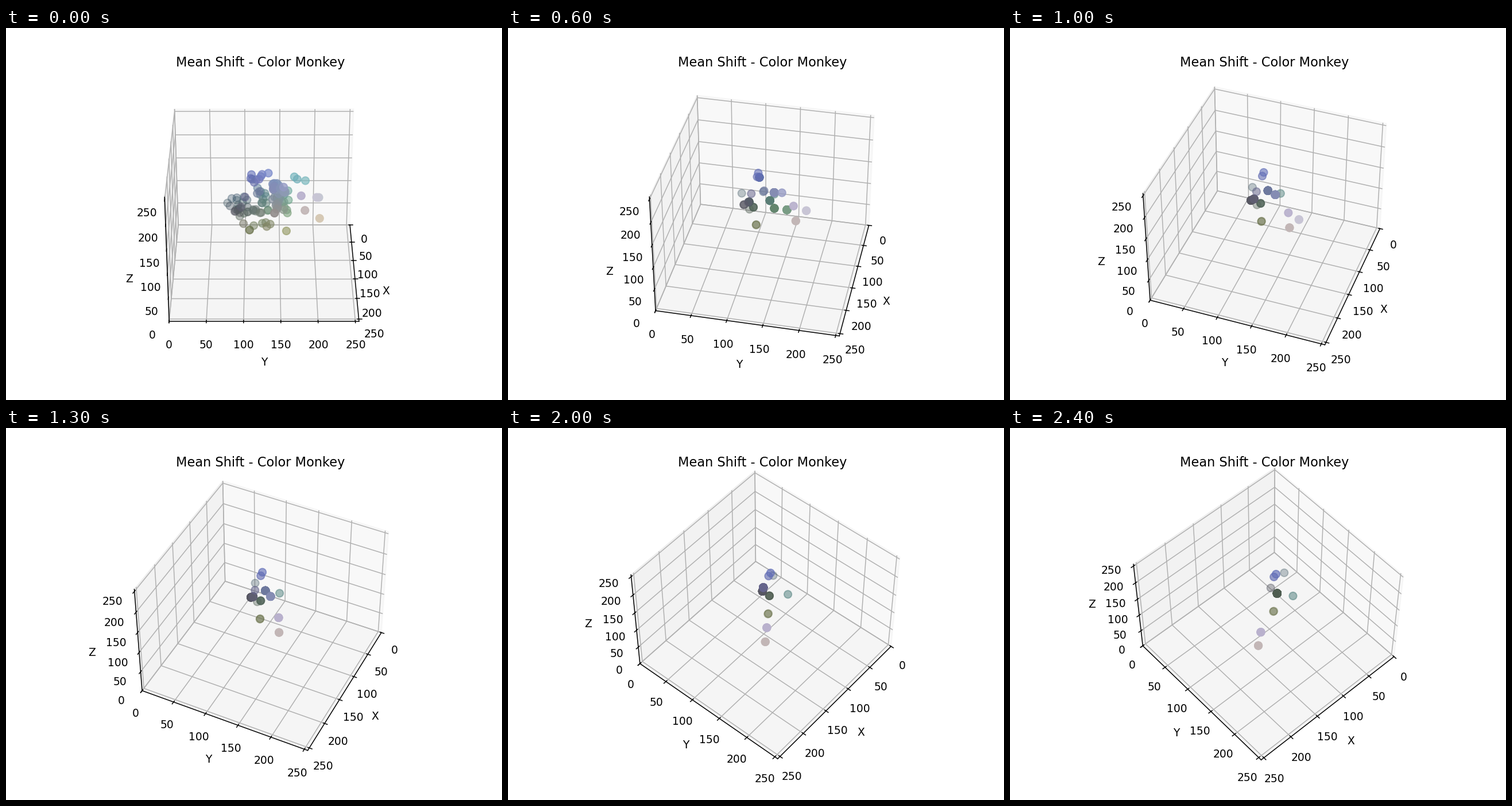
A matplotlib script for the animation above (2500 ms loop, 864 by 648 pixels).

```python
import numpy as np
import matplotlib.pyplot as plt
from matplotlib.animation import FuncAnimation

FRAMES = 25
rng = np.random.default_rng(7)

# Modes that hold to the end: dark teal, dark green, lavender, rose.
FINAL = [(49, 75, 87), (79, 93, 81), (185, 177, 205), (194, 182, 182)]
# Modes that are absorbed one after another, longest lived first.
FADING = [(87, 87, 98), (102, 101, 140), (110, 121, 158), (133, 140, 179),
          (96, 95, 114), (80, 99, 88), (200, 197, 213), (149, 154, 196), (101, 118, 147)]
# Outliers that stay put and attract nothing.
LONERS = [(97, 110, 184), (100, 109, 178), (83, 130, 127),
          (98, 107, 66), (99, 107, 66), (85, 86, 96)]
# Shades of the remaining samples: from, to, count.
SHADES = [
    ((122, 140, 185), (142, 154, 180), 14),  # blue
    ((88, 118, 140), (96, 130, 112), 10),    # teal
    ((120, 143, 160), (148, 146, 140), 15),  # slate to grey
    ((102, 157, 150), (125, 160, 125), 9),   # green
    ((68, 84, 88), (108, 124, 112), 17),     # dark grey
    ((52, 78, 98), (75, 100, 120), 6),       # deep teal
    ((103, 110, 172), (120, 132, 200), 7),   # bright blue
    ((90, 104, 76), (148, 158, 112), 7),     # olive
    ((100, 165, 178), (118, 182, 188), 3),   # light teal
    ((202, 198, 214), (210, 206, 182), 2),   # pale
]


def shade(start, end, n):
    t = np.linspace(0, 1, n)[:, None]
    mix = (1 - t) * np.array(start) + t * np.array(end)
    return mix + rng.normal(0, 4, (n, 3))


def merge(points, last, attracts):
    """For every step, the index of the sample each point sits on."""
    spot = np.arange(len(points))
    steps = []
    for k in range(FRAMES):
        alive = np.flatnonzero(attracts & (last >= k))
        for i in np.flatnonzero(last[spot] < k):
            gap = np.linalg.norm(points[alive] - points[spot[i]], axis=1)
            spot[i] = alive[gap.argmin()]
        steps.append(spot.copy())
    return steps


cloud = np.vstack([shade(*s) for s in SHADES])
points = np.vstack([LONERS, FINAL, FADING, cloud])
last = np.concatenate([
    np.full(len(LONERS) + len(FINAL), FRAMES),
    np.linspace(23, 8, len(FADING)),
    np.minimum(rng.geometric(0.35, len(cloud)) - 1, 9),
])
steps = merge(points, last, np.arange(len(points)) >= len(LONERS))

fig = plt.figure(figsize=(6.4, 4.8), dpi=135)
ax = fig.add_subplot(projection="3d")
ax.set_title("Mean Shift - Color Monkey")
ax.set(xlim=(0, 255), ylim=(0, 255), zlim=(0, 255), xlabel="X", ylabel="Y", zlabel="Z")
dots = None


def draw(k):
    global dots
    if dots is not None:
        dots.remove()
    p = points[steps[k]]
    dots = ax.scatter(*p.T, c=p / 255, s=50)
    ax.view_init(elev=30 + k, azim=2 * k)
    return dots,


anim = FuncAnimation(fig, draw, frames=FRAMES, interval=100, init_func=lambda: (),
                     repeat=True, repeat_delay=0)
plt.show()
```
